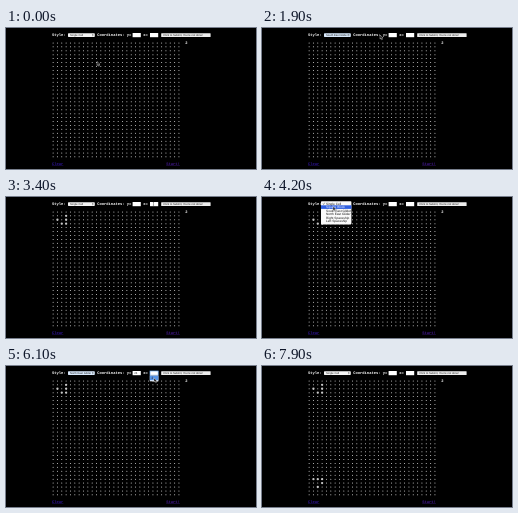
Recreate the animation shown at these times as an HTML page. Size 250x141 px, loop 8000 ms.

```html
<!DOCTYPE html>
<html lang="en">
<head>
<meta charset="utf-8">
<title>Life board editor</title>
<style>
html, body { margin: 0; width: 100%; height: 100%; overflow: hidden; background: #000; }
svg { display: block; width: 100vw; height: 100vh; text-rendering: geometricPrecision; }
.mono { font: bold 3.8px "Liberation Mono", monospace; fill: #fff; }
.ui { font: 2.75px "Liberation Sans", sans-serif; fill: #222; }
.item { font: 3.2px "Liberation Sans", sans-serif; fill: #111; }
.link { text-decoration: underline; }
</style>
</head>
<body>
<svg id="stage" viewBox="0 0 250 141"></svg>
<script>
const LOOP = 8000, STEP = 100;
const stage = document.getElementById('stage');

function add(tag, attrs, parent = stage, text = '') {
  const el = document.createElementNS('http://www.w3.org/2000/svg', tag);
  for (const k in attrs) el.setAttribute(k, attrs[k]);
  el.textContent = text;
  parent.appendChild(el);
  return el;
}
const label = (x, y, text, cls, parent, style = '') =>
  add('text', { x, y, class: cls, style }, parent, text);
const box = (x, y, width, height, fill, parent, extra = {}) =>
  add('rect', { x, y, width, height, fill, ...extra }, parent);
const show = (el, on) => { el.style.display = on ? '' : 'none'; };

// Board
const cellX = c => 47.1 + c * 4.34;
const cellY = r => 14.9 + r * 3.93;
for (let r = 0; r < 30; r++)
  for (let c = 0; c < 30; c++)
    add('circle', { cx: cellX(c), cy: cellY(r), r: 0.5, fill: '#e2e2e2' });

function glider(row, rows) {
  const g = add('g', {});
  rows.forEach((line, i) => [...line].forEach((ch, j) => {
    if (ch === 'o') add('circle', { cx: cellX(j + 1), cy: cellY(row + i), r: 1.15, fill: '#c8c8c8' }, g);
  }));
  return g;
}
const southEast = glider(1, ['..o', 'o.o', '.oo']);
const northEast = glider(25, ['ooo', '..o', '.o.']);

label(46, 136.6, 'Clear', 'mono link', stage, 'fill:#2b128f');
label(160.2, 136.6, 'Start!', 'mono link', stage, 'fill:#40168a');
label(179.2, 16.4, '2', 'mono');

// Form
label(46, 8.4, 'Style:', 'mono');
label(91.2, 8.4, 'Coordinates: y=', 'mono');
label(137.2, 8.4, 'x=', 'mono');
const select = box(62, 5.3, 26.8, 3.6, '#f4f4f4', stage, { rx: 0.6 });
const choice = label(64, 8.1, '', 'ui');
add('path', { d: 'M86 6.8l.8-.9.8.9zM86 7.4l.8.9.8-.9z', fill: '#333' });
const button = box(155.2, 5.3, 49.4, 3.7, '#eee', stage, { rx: 0.5 });
label(157.2, 8.1, "Click to Submit, You're not done!", 'ui');

function field(x) {
  const frame = box(x, 5, 8.2, 4.2, '#fff', stage, { 'stroke-width': 0.7 });
  const value = label(x + 1.6, 8.2, '', 'ui');
  return (text, focus) => {
    frame.setAttribute('stroke', focus ? '#68a8ee' : 'none');
    value.textContent = text;
  };
}
const setY = field(126.6), setX = field(144);

function suggestions(x, items, height, active) {
  const g = add('g', {});
  box(x, 9.5, 8.6, height, '#fff', g);
  items.forEach((text, i) => {
    if (i === active) box(x, 9.8 + i * 5, 8.6, 4.5, '#5795e8', g);
    label(x + 1.7, 13.1 + i * 5, text, 'item', g);
  });
  return g;
}
const listY = suggestions(126.4, ['2', '27', '28'], 16, -1);
const listX = suggestions(143.8, ['2'], 5.8, 0);

// Style menu
const styles = ['Single Cell', 'Square Block', 'South East Glider',
  'North East Glider', 'Right Spaceship', 'Left Spaceship'];
const menu = add('g', {});
box(59, 4.2, 30.4, 23.2, '#fafafa', menu, { rx: 0.8 });
const bar = box(59, 0, 30.4, 3.6, '#2f5fe0', menu);
const items = styles.map((text, i) => label(64, 7.7 + i * 3.55, text, 'item', menu));
add('path', { d: 'M60.9 6.6l.7.9 1.2-1.9', fill: 'none', stroke: '#111', 'stroke-width': 0.4 }, menu);

// Pointer
const pointer = add('g', {});
const arrow = add('path', { d: 'M0 0v4.1l1-.9.7 1.5.7-.3-.7-1.5h1.3z',
  fill: '#111', stroke: '#eee', 'stroke-width': 0.4 }, pointer);
const beam = add('path', { d: 'M-.6-1.5h1.2M0-1.5v3M-.6 1.5h1.2',
  fill: 'none', stroke: '#333', 'stroke-width': 0.4 }, pointer);

const path = [
  [0, 91, 33.5], [200, 86, 22], [400, 72, 2], [600, 70, 6], [1000, 70, 6],
  [1400, 72, 14], [1500, 72, 14], [1900, 118, 7], [2100, 130, 7], [2200, 130, 7],
  [2500, 130, 12], [2700, 148, 7], [2900, 148, 7], [3100, 163, 7], [3300, 163, 7],
  [3900, 70, 6], [4000, 70, 6], [4200, 71, 9.5], [4500, 72, 17], [4900, 131, 7],
  [5400, 131, 7], [5600, 131, 16], [5800, 148, 7], [6100, 148, 12], [6300, 148, 12],
  [6600, 168, 7], [6800, 168, 7], [7300, 211.5, 44.5], [LOOP, 211.5, 44.5]
];
function position(t) {
  const i = path.findIndex(p => p[0] > t);
  const a = path[i - 1], b = path[i];
  const k = (t - a[0]) / (b[0] - a[0]);
  return [a[1] + (b[1] - a[1]) * k, a[2] + (b[2] - a[2]) * k];
}

function render(t) {
  const within = (a, b) => t >= a && t < b;
  const [px, py] = position(t);

  show(southEast, t >= 3400);
  show(northEast, t >= 7000);

  const picked = within(1600, 3400) ? 2 : within(4600, 7000) ? 3 : 0;
  choice.textContent = styles[picked];
  select.setAttribute('fill', picked ? '#d9e9fb' : '#f4f4f4');
  button.setAttribute('fill', within(3200, 3400) || within(6800, 7000) ? '#b9d4f5' : '#eee');

  const open = within(1100, 1600) || within(4100, 4600);
  const hover = Math.max(0, Math.min(5, Math.floor((py - 4.6) / 3.55)));
  show(menu, open);
  bar.setAttribute('y', 4.75 + hover * 3.55);
  items.forEach((el, i) => { el.style.fill = i === hover ? '#fff' : '#111'; });

  setY(within(2600, 3400) ? '2' : within(5600, 7000) ? '26' : '',
    within(2100, 2800) || within(5000, 5800));
  setX(within(3000, 3400) || within(6200, 7000) ? '2' : '',
    within(2800, 3200) || within(5800, 6400));
  show(listY, within(2300, 2800) || within(5200, 5700));
  show(listX, within(2900, 3100) || within(5900, 6300));

  const overField = py > 4 && py < 9.5 && (px > 126 && px < 135 || px > 143.5 && px < 152.5);
  show(pointer, t < 7900);
  show(arrow, !overField);
  show(beam, overField);
  pointer.setAttribute('transform', `translate(${px} ${py})`);
}

const start = performance.now();
function tick() {
  const t = (performance.now() - start) % LOOP;
  render(Math.floor(t / STEP) * STEP);
  requestAnimationFrame(tick);
}
tick();
</script>
</body>
</html>
```
